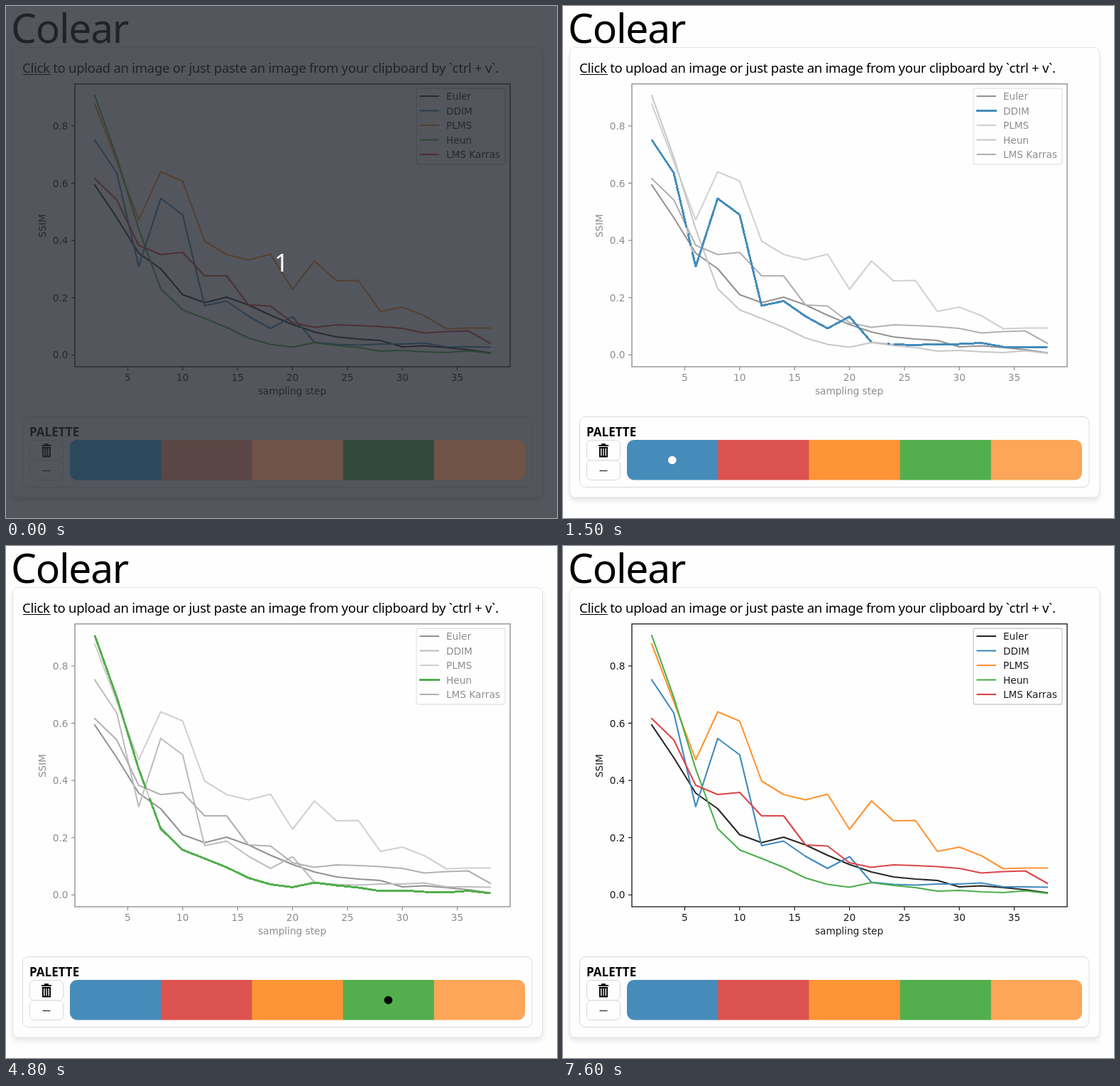
An HTML page that plays this animation: 776 px wide and 721 px high, repeating every 8 s.

```html
<!DOCTYPE html>
<html lang="en">
<head>
<meta charset="utf-8">
<title>Colear</title>
<style>
  html, body { margin: 0; width: 100%; height: 100%; overflow: hidden; background: #fefefe; }
  svg { display: block; width: 776px; height: 721px; }
  .ui { font-family: "Noto Sans", "Open Sans", sans-serif; }
  .plot { font: 13.65px "DejaVu Sans", sans-serif; fill: #1c1c1c; }
  .plot path, .plot rect { fill: none; }
  .card { filter: drop-shadow(0 4px 3px rgba(0, 0, 0, .1)); }
  .box { fill: #fefefe; stroke: #d9d9d9; }
</style>
</head>
<body>
<svg id="stage" viewBox="0 0 776 721">
  <defs>
    <clipPath id="bar"><rect x="90" y="611" width="641" height="56.5" rx="10"/></clipPath>
  </defs>
  <rect width="776" height="721" fill="#fefefe"/>
  <rect class="card" x="9.5" y="58.5" width="746" height="633.5" rx="8" fill="#fefefe" stroke="#e5e5e5"/>
  <g class="ui">
    <text x="7" y="52" font-size="57" letter-spacing="-1.3">Colear</text>
    <text x="23" y="93.5" font-size="18.5" letter-spacing="-.27">Click to upload an image or just paste an image from your clipboard by `ctrl + v`.</text>
    <path d="M24 96.5H63" stroke="#000"/>
    <rect class="box" x="23.5" y="578.5" width="717.5" height="99" rx="8"/>
    <text x="33" y="606" font-size="17" font-weight="700">PALETTE</text>
    <rect class="box" x="33.5" y="611.5" width="47" height="28.5" rx="6"/>
    <rect class="box" x="33.5" y="640" width="47" height="27.5" rx="6"/>
    <path d="M50 619H64M54 617.2H60M50.8 622H63.2M52 622V634.5H62V622M55.4 622V634M58.6 622V634" fill="none" stroke="#000" stroke-width="1.9"/>
    <path d="M51.5 654.5H62.5" stroke="#222" stroke-width="1.2"/>
  </g>
  <g id="plot" class="plot"></g>
  <g id="marks" fill="none" shape-rendering="crispEdges"></g>
  <g id="swatches" clip-path="url(#bar)"></g>
  <circle id="dot" cy="639.5" r="5.8"/>
  <g id="cover" class="ui">
    <rect width="776" height="721" fill="#282c34" fill-opacity=".8"/>
    <g id="dimSwatches" clip-path="url(#bar)"></g>
    <text x="388" y="373.5" font-size="35" text-anchor="middle" fill="#fff">1</text>
  </g>
</svg>
<script>
const $ = id => document.getElementById(id);

function add(parent, tag, attrs, text) {
  const el = document.createElementNS("http://www.w3.org/2000/svg", tag);
  for (const k in attrs) el.setAttribute(k, attrs[k]);
  if (text) el.textContent = text;
  parent.appendChild(el);
  return el;
}

// One height per sampled step, 2 to 38.
const series = [
  { name: "Euler", color: "#282828", ys: [252, 298, 348, 370, 406.5, 417.8, 410, 421, 435.5, 448.5, 459, 466, 469, 471, 480, 478.5, 481, 484, 488.5] },
  { name: "DDIM", color: "#4089bd", ys: [188.5, 235, 367, 271, 294, 422, 415.5, 437, 454, 437.5, 473.5, 476.5, 477.5, 476, 476, 474.5, 480, 480, 480.5] },
  { name: "PLMS", color: "#ff9435", ys: [138, 219, 301, 233.5, 246.5, 331, 350, 357.5, 349.5, 399, 359, 387, 386.5, 430, 424, 436, 454.5, 453.5, 453.5] },
  { name: "Heun", color: "#4bae4b", ys: [126, 213, 314, 398, 428, 440, 452.5, 467.5, 476.5, 480.5, 474, 478, 481, 486, 485, 487, 488, 485.5, 489] },
  { name: "LMS Karras", color: "#db4648", ys: [243, 273, 337, 350, 347, 380, 380, 421, 422.5, 446, 452.5, 449, 450, 451.5, 454, 460.5, 458.5, 457.5, 475] }
];

// Each palette colour, the series it picks and the x spans it reaches.
const palette = [
  { color: "#468cba", dim: "#2c495b", row: 1, spans: [[124, 174], [176, 180], [182, 434], [457, 460], [466, 683]] },
  { color: "#dc5350", dim: "#5a4644", row: 4, spans: [[124, 683]] },
  { color: "#fd9436", dim: "#6f5349", row: 2, spans: [[124, 153], [171, 683]] },
  { color: "#53af4e", dim: "#334a3b", row: 3, spans: [[124, 197], [202, 683]] },
  { color: "#fda558", dim: "#705448", row: 2, spans: [[124, 156], [171, 480], [492, 648], [669, 683]], rough: true }
];

const stepX = v => 94.1 + 15.47 * v;
const valueY = v => 491.3 - 403 * v;
const legendY = row => 127 + row * 20.5;
const toPath = points => "M" + points.map(p => p.map(n => n.toFixed(1))).join("L");
const nodes = ys => ys.map((y, i) => [stepX(2 + 2 * i), y]);

function slice(ys, [from, to]) {
  const pts = nodes(ys), last = pts[pts.length - 1];
  const at = x => {
    if (x <= pts[0][0]) return pts[0];
    if (x >= last[0]) return last;
    const i = pts.findIndex(p => p[0] > x), [a, b] = [pts[i - 1], pts[i]];
    return [x, a[1] + (b[1] - a[1]) * (x - a[0]) / (b[0] - a[0])];
  };
  return toPath([at(from), ...pts.filter(p => p[0] > from && p[0] < to), at(to)]);
}

function buildPlot() {
  const g = $("plot"), ink = "#262626";
  let ticks = "";
  for (let v = 5; v <= 35; v += 5) {
    ticks += `M${stepX(v)} 508v5`;
    add(g, "text", { x: stepX(v), y: 528, "text-anchor": "middle" }, String(v));
  }
  for (let v = 0; v <= 8; v += 2) {
    ticks += `M97 ${valueY(v / 10)}h-5`;
    add(g, "text", { x: 87.5, y: valueY(v / 10) + 5, "text-anchor": "end" }, (v / 10).toFixed(1));
  }
  add(g, "path", { d: ticks, stroke: ink, "stroke-width": 1.3 });
  add(g, "text", { x: 403, y: 546.5, "text-anchor": "middle" }, "sampling step");
  add(g, "text", { transform: "translate(56 309.5) rotate(-90)", "text-anchor": "middle" }, "SSIM");
  for (const s of series)
    add(g, "path", { d: toPath(nodes(s.ys)), stroke: s.color, "stroke-width": 2.1, "stroke-linejoin": "round", "stroke-linecap": "square" });
  add(g, "rect", { x: 97, y: 109.7, width: 613, height: 398.3, stroke: ink, "stroke-width": 1.4 });
  add(g, "rect", { x: 578, y: 116, width: 125, height: 107, rx: 3, stroke: "#ccc", "stroke-width": 1.3 });
  series.forEach((s, i) => {
    add(g, "path", { d: `M582.5 ${legendY(i)}H610`, stroke: s.color, "stroke-width": 2.1 });
    add(g, "text", { x: 620, y: legendY(i) + 5 }, s.name);
  });
}

function buildPalette() {
  palette.forEach((p, i) => {
    const cell = { x: 90 + 128.2 * i, y: 611, width: 129, height: 57 };
    add($("swatches"), "rect", { ...cell, fill: p.color });
    add($("dimSwatches"), "rect", { ...cell, fill: p.dim });
    p.mark = add($("marks"), "g", { stroke: p.color, "stroke-linejoin": "round" });
    const y = legendY(p.row);
    const d = p.spans.map(s => slice(series[p.row].ys, s)).join("");
    add(p.mark, "path", { d: d + `M582 ${y}H611`, "stroke-width": 3 });
    if (p.rough)
      add(p.mark, "path", { d, "stroke-width": 4.4, "stroke-dasharray": "1.5 1.5" });
  });
}

// Start time and the picked palette cell, -1 for none.
const scenes = [[0, -1], [1500, 0], [2600, 1], [3700, 2], [4800, 3], [6400, 4], [7600, -1]];

function render(t) {
  const pick = scenes.filter(s => s[0] <= t).pop()[1];
  const picked = pick >= 0;
  $("cover").style.display = t < 100 ? "" : "none";
  $("plot").style.filter = "blur(.4px)" + (picked ? " grayscale(1) opacity(.5)" : "");
  palette.forEach((p, i) => p.mark.style.display = i === pick ? "" : "none");
  $("dot").style.display = picked ? "" : "none";
  if (picked) {
    $("dot").setAttribute("cx", 153.8 + 128.2 * pick);
    $("dot").setAttribute("fill", pick < 2 ? "#fff" : "#000");
  }
}

buildPlot();
buildPalette();
render(0);
const start = performance.now();
function tick() {
  render((performance.now() - start) % 8000);
  requestAnimationFrame(tick);
}
requestAnimationFrame(tick);
</script>
</body>
</html>
```
